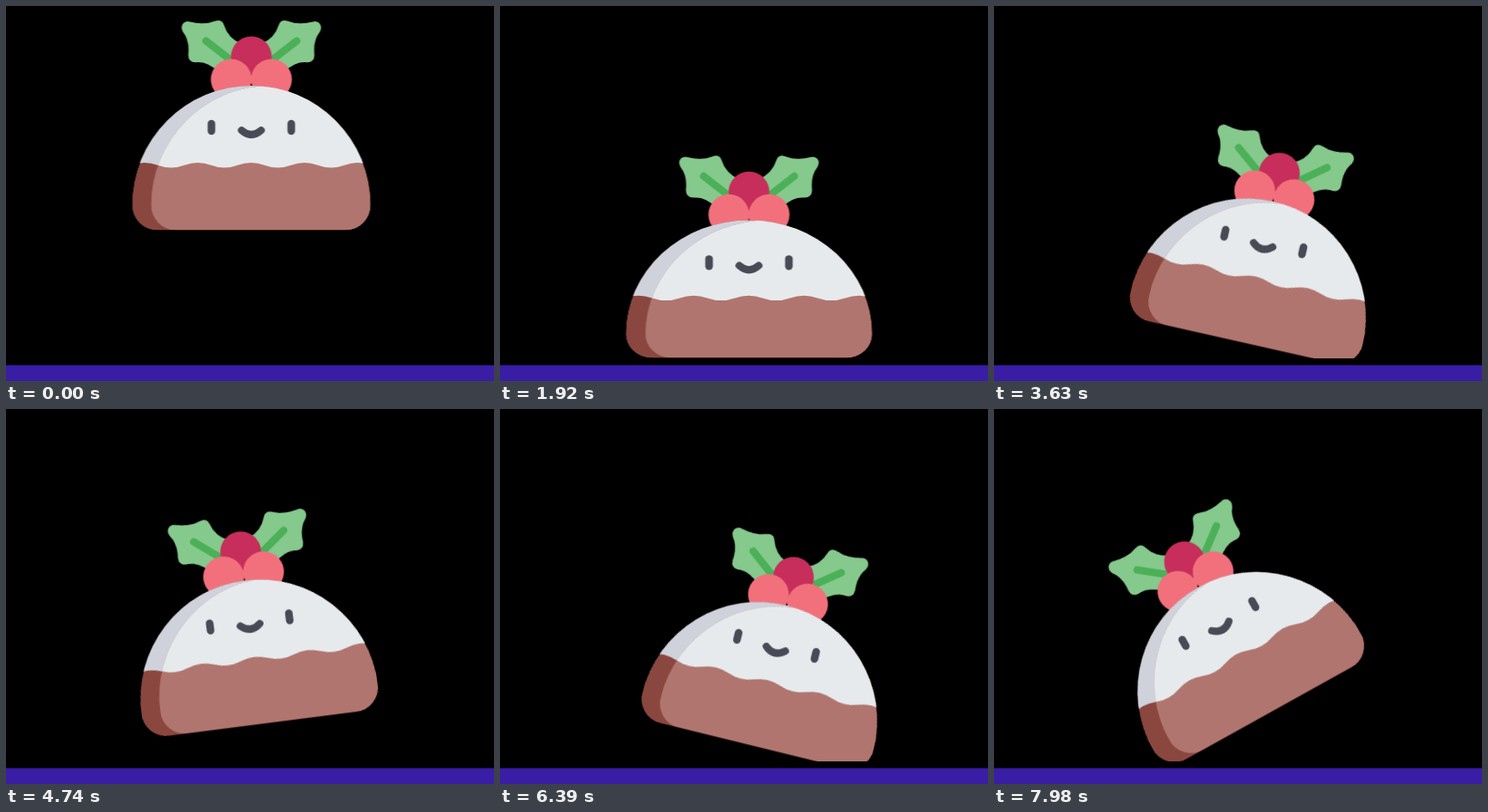
Write an HTML page without scripts that moves like this. It is 538 px wide and 414 px high and loops after 8000 ms.

```html
<!DOCTYPE html>
<html lang="en">
<head>
<meta charset="utf-8">
<title>Bouncing pudding</title>
<style>
@property --sag { syntax: "<number>"; inherits: true; initial-value: 0; }

html, body { margin: 0; width: 100%; height: 100%; overflow: hidden; background: #000; }
svg { display: block; width: 100vw; height: 100vh; }

.x, .y, .tilt { animation: 8s linear infinite; }
.x { animation-name: drift; }
.y { animation-name: hop; }
.tilt { animation-name: rock, squash; }

.body {
  transform-origin: 270.5px 247px;
  transform: scale(calc(1 + .033 * var(--sag)), calc(1 - .047 * var(--sag)));
}
.rigid { transform: translateY(calc(8.3px * var(--sag))); }
.icing { transform: translateY(calc(2.5px * var(--sag))); }

@keyframes drift {
  0%, 10% { transform: translateX(270.5px); }
  17.5% { transform: translateX(271.5px); }
  24%, 27% { transform: translateX(274.5px); }
  32.75% { transform: translateX(270px); }
  36.75% { transform: translateX(267.6px); }
  39.4% { transform: translateX(269.5px); }
  45.4% { transform: translateX(290px); }
  46.25% { transform: translateX(291px); }
  50% { transform: translateX(283px); }
  57.5% { transform: translateX(279px); }
  59.25% { transform: translateX(273px); }
  63.5%, 69% { transform: translateX(270px); }
  74% { transform: translateX(279px); }
  79.9% { transform: translateX(296.8px); }
  84% { transform: translateX(283px); }
  89.25% { transform: translateX(281px); }
  95% { transform: translateX(274px); }
  99.75%, 100% { transform: translateX(264.5px); }
}

/* Parabolic arcs: (1/3, 0, 2/3, 1/3) falls, (1/3, 2/3, 2/3, 1) rises */
@keyframes hop {
  0% { transform: translateY(168px); }
  3% { transform: translateY(168px); animation-timing-function: cubic-bezier(.333, 0, .667, .333); }
  10% { transform: translateY(309px); }
  11.6% { transform: translateY(309px); animation-timing-function: cubic-bezier(.333, .667, .667, 1); }
  14.25% { transform: translateY(283px); animation-timing-function: cubic-bezier(.333, 0, .667, .333); }
  17.4% { transform: translateY(309px); }
  27.1% { transform: translateY(309px); animation-timing-function: cubic-bezier(.333, .667, .667, 1); }
  32.75% { transform: translateY(215px); animation-timing-function: cubic-bezier(.333, 0, .667, .333); }
  37.75% { transform: translateY(292px); }
  39%, 41% { transform: translateY(309px); }
  45.4% { transform: translateY(293.7px); }
  46.25% { transform: translateY(293px); }
  50% { transform: translateY(309px); }
  57.6% { transform: translateY(309px); animation-timing-function: cubic-bezier(.333, .667, .667, 1); }
  63.5% { transform: translateY(226px); animation-timing-function: cubic-bezier(.333, 0, .667, .333); }
  68.75% { transform: translateY(292px); }
  70%, 75% { transform: translateY(309px); }
  79.9% { transform: translateY(294.5px); }
  83.5% { transform: translateY(309px); }
  89.25% { transform: translateY(309px); animation-timing-function: cubic-bezier(.333, .667, .667, 1); }
  95% { transform: translateY(230px); animation-timing-function: cubic-bezier(.333, 0, .667, .333); }
  99.75%, 100% { transform: translateY(266.5px); }
}

@keyframes rock {
  0%, 27% { transform: rotate(0deg); }
  32.75% { transform: rotate(-3deg); }
  36.75% { transform: rotate(-6.9deg); }
  37.75% { transform: rotate(-9deg); }
  40% { transform: rotate(0deg); animation-timing-function: ease-out; }
  45.4% { transform: rotate(12.7deg); }
  46.25% { transform: rotate(13deg); animation-timing-function: ease-in; }
  50%, 57.6% { transform: rotate(0deg); }
  59.25% { transform: rotate(-7.3deg); }
  63.5% { transform: rotate(-8deg); }
  68.75% { transform: rotate(-10deg); }
  71% { transform: rotate(0deg); }
  75% { transform: rotate(3deg); animation-timing-function: ease-out; }
  79.9% { transform: rotate(13.8deg); animation-timing-function: ease-in; }
  83.5%, 89.25% { transform: rotate(0deg); }
  95% { transform: rotate(-11deg); }
  99.75%, 100% { transform: rotate(-29.1deg); }
}

@keyframes squash {
  0%, 9.8% { --sag: 0; }
  10.8% { --sag: 2.3; }
  12.2%, 17% { --sag: 0; }
  18.5% { --sag: 1.8; }
  20.5% { --sag: .5; }
  22.5% { --sag: 1.2; }
  24% { --sag: 1; }
  25.5% { --sag: 1.5; }
  27.5%, 38% { --sag: 0; }
  39.4% { --sag: 2.2; }
  41.5%, 49% { --sag: 0; }
  51% { --sag: 1.5; }
  53% { --sag: .8; }
  56% { --sag: 1.4; }
  58%, 69% { --sag: 0; }
  70.5% { --sag: 1.9; }
  73% { --sag: .5; }
  77%, 82.5% { --sag: 0; }
  84.5% { --sag: 1.5; }
  86% { --sag: .9; }
  87.7% { --sag: 1.8; }
  89.5%, 100% { --sag: 0; }
}
</style>
</head>
<body>
<svg viewBox="0 0 538 414" preserveAspectRatio="none">
  <defs>
    <path id="dome" d="M139 220A131.5 132 0 0 1 402 220A27.5 27.5 0 0 1 374.5 247.5H166.5A27.5 27.5 0 0 1 139 220Z"/>
    <path id="icing" d="M137.9 175.7q14.7-5.6 29.4 0t29.4 0 29.4 0 29.4 0 29.4 0 29.4 0 29.4 0 29.4 0 29.4 0V60H137.9Z"/>
    <g id="leaf">
      <path fill="#85c98c" d="M203 17.6Q218 21.5 230 16.8Q238 14 240.3 21Q245 36 260 42L250 72H233Q222 61 209 62.2Q200.5 62 201 53Q202.5 38 195 28.5Q192 23 195.5 19Q199 16 203 17.6Z"/>
      <path stroke="#4bb058" stroke-width="8" stroke-linecap="round" d="M220.5 38.5L250 61.5"/>
    </g>
    <clipPath id="inDome"><use href="#dome"/></clipPath>
    <clipPath id="lit"><use href="#dome" x="21"/></clipPath>
    <clipPath id="air"><path d="M0-200H538V389H0Z"/></clipPath>
  </defs>

  <rect width="538" height="414"/>
  <g clip-path="url(#air)">
    <g class="x"><g class="y"><g class="tilt"><g transform="translate(-270.5 -168)">
      <g class="rigid">
        <use href="#leaf"/>
        <use href="#leaf" transform="translate(541) scale(-1 1)"/>
        <circle cx="270.5" cy="56" r="22.5" fill="#c72e5b"/>
        <g fill="#f2707c">
          <circle cx="248.3" cy="81" r="22.5"/>
          <circle cx="292.7" cy="81" r="22.5"/>
        </g>
      </g>
      <g class="body"><g clip-path="url(#inDome)">
        <use href="#dome" fill="#8a473f"/>
        <use class="icing" href="#icing" fill="#cfd2db"/>
        <g clip-path="url(#lit)">
          <use href="#dome" fill="#b0756e"/>
          <use class="icing" href="#icing" fill="#e6eaed"/>
        </g>
      </g></g>
      <g class="rigid" fill="#484b55">
        <rect x="222.3" y="125.8" width="8.4" height="16.4" rx="4.2"/>
        <rect x="310.3" y="125.8" width="8.4" height="16.4" rx="4.2"/>
        <path fill="none" stroke="#484b55" stroke-width="8" stroke-linecap="round" d="M259.7 137.2Q270.5 146.8 281.3 137.2"/>
      </g>
    </g></g></g></g>
  </g>
  <rect y="396.5" width="538" height="18" fill="#391da5"/>
</svg>
</body>
</html>
```
